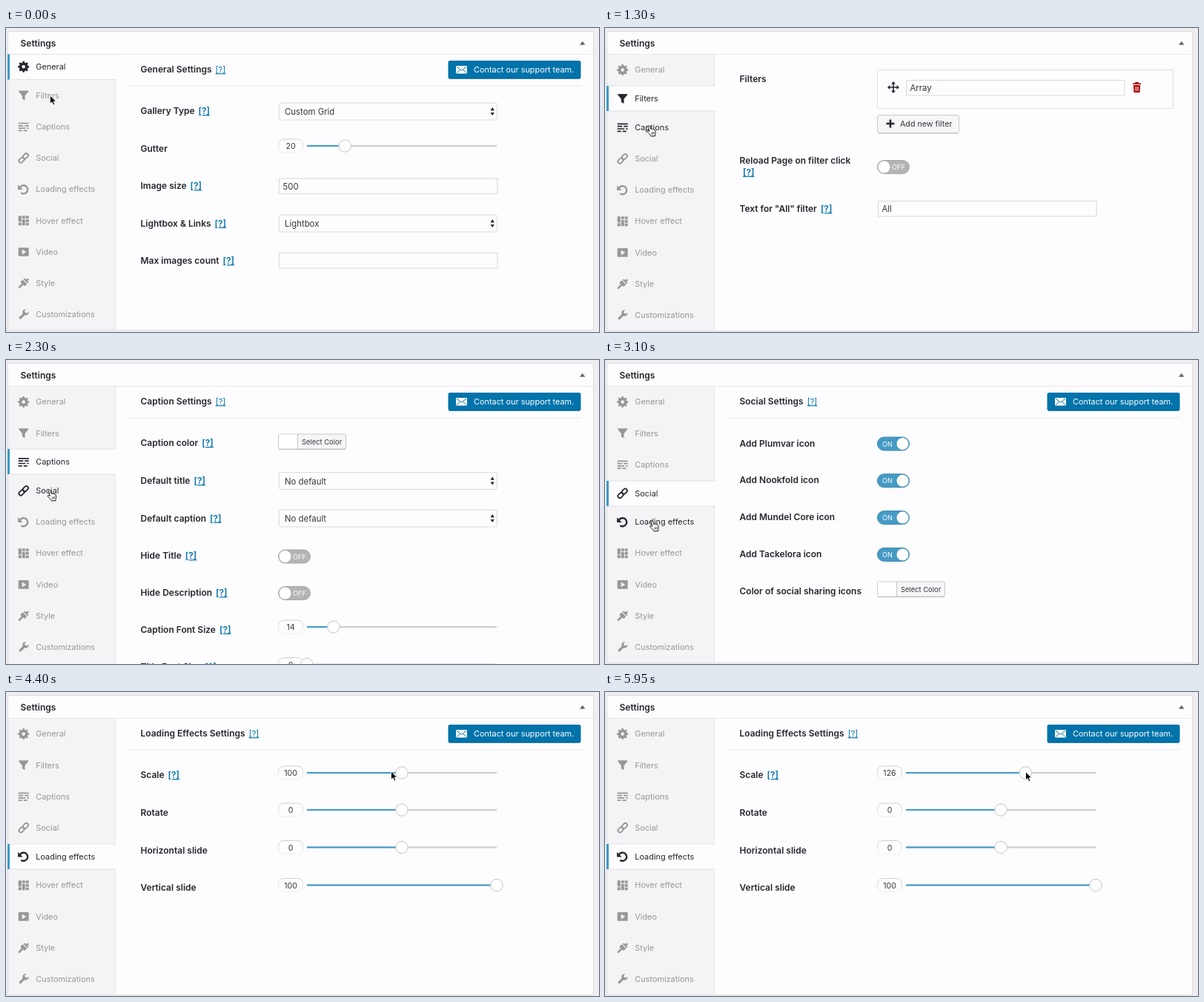
Recreate the animation shown at these times as an HTML page. Size 800x410 px, loop 6 s.

```html
<!DOCTYPE html>
<html lang="en">
<head>
<meta charset="utf-8">
<title>Settings panel</title>
<style>
  html, body { margin: 0; width: 100%; height: 100%; overflow: hidden; background: #eeedef; }
  svg { display: block; width: 800px; height: 410px; font-family: Inter, "Open Sans", sans-serif; }
  text { fill: #32373c; white-space: pre; }
  .b { font-size: 12px; font-weight: 600; fill: #23282d; }
  .f { font-size: 11.4px; }
  .q { fill: #0073aa; text-decoration: underline; }
  .n { font-size: 11px; font-weight: 400; }
  .side { font-size: 10.9px; fill: inherit; }
  .box { fill: #fefdfe; stroke: #d9d8da; }
</style>
</head>
<body>
<svg id="stage" viewBox="0 0 800 410"></svg>
<script>
const LOOP = 6000, STEP = 50;
const BLUE = '#3a9bc9', DARK = '#23282d', GREY = '#979698';
const TRACK = 406, SPAN = 256;
const stage = document.getElementById('stage');
const $ = id => document.getElementById(id);

const text = (x, y, s, cls = 'f', extra = '') =>
  `<text x="${x}" y="${y + 4.2}" class="${cls}" ${extra}>${s}</text>`;
const rect = (x, y, w, h, r = 0, attrs = 'class="box"') =>
  `<rect x="${x}" y="${y}" width="${w}" height="${h}" rx="${r}" ${attrs}/>`;
const path = (d, attrs = '') => `<path d="${d}" ${attrs}/>`;

const label = (y, s, help = true) =>
  text(181.5, y, s + (help ? '<tspan dx="5" class="q">[?]</tspan>' : ''), 'b');

const input = (y, s = '', x = 368.5) =>
  rect(x, y - 10, 294.5, 20.5) + text(x + 5, y + .5, s);

const select = (y, s) =>
  rect(368.5, y - 11.5, 294, 23, 2.5) + text(376, y + .3, s) +
  path(`M653.5 ${y - 1.2}l2.7-4.2 2.7 4.2zm0 2.6l2.7 4.2 2.7-4.2z`, `fill="${DARK}"`);

const knobX = part => TRACK + SPAN * part;

const slider = (y, value, part, id = '') => {
  const x = knobX(part);
  const name = s => id ? `id="${id + s}"` : '';
  return rect(367.5, y - 9, 33, 18, 7, 'fill="#fefdfe" stroke="url(#fade)"') +
    text(384, y + .2, value, '', `${name('Val')} font-size="10.6" text-anchor="middle"`) +
    path(`M${TRACK} ${y}H${TRACK + SPAN}`, 'stroke="#cbcacc" stroke-width="2"') +
    `<line x1="${TRACK}" x2="${x}" y1="${y}" y2="${y}" stroke="${BLUE}" stroke-width="2" ${name('Bar')}/>` +
    `<circle cx="${x}" cy="${y}" r="8.2" fill="#fff" stroke="#c5c4c6" ${name('Knob')}/>`;
};

const toggle = (y, on) =>
  rect(367.5, y - 9, 43, 18, 9, on
    ? 'fill="#459ac4" stroke="#3c88ae"' : 'fill="#b4b3b5" stroke="#a6a5a7"') +
  text(on ? 374 : 387, y - .6, on ? 'ON' : 'OFF', '', 'font-size="9.2" style="fill:#fff"') +
  `<circle cx="${on ? 401.5 : 376.5}" cy="${y}" r="8" fill="#fff"/>`;

const colorPick = y =>
  rect(367.5, y - 10, 91, 20, 2, 'fill="#f6f5f7" stroke="#c9c8ca"') +
  rect(368, y - 9.5, 25.5, 19, 1.5, 'fill="#fff"') +
  path(`M393.5 ${y - 10}v20`, 'stroke="#c9c8ca"') +
  path(`M368 ${y + 10.5}H458`, 'stroke="#bdbcbe"') +
  text(399, y - .5, 'Select Color', '', 'font-size="9.4"');

const heading = s =>
  text(181.5, 56, `${s}<tspan dx="5" class="q n">[?]</tspan>`, 'b') +
  path('M164 78H776', 'stroke="#eae9eb"') +
  rect(596.5, 44, 179, 24.5, 2.5, 'fill="#0073aa"') +
  path('M598 68H774', 'stroke="#005f8d"') +
  rect(607, 51, 15, 10.5, 1, 'fill="#fff"') +
  path('M608 52.3l6.5 5 6.5-5M608 60.5l4.3-4M621 60.5l-4.3-4', 'fill="none" stroke="#0073aa"') +
  text(631, 56, 'Contact our support team.', '', 'font-size="10.9" style="fill:#fff"');

const general = heading('General Settings') +
  label(112, 'Gallery Type') + select(112.5, 'Custom Grid') +
  label(163, 'Gutter', false) + slider(159, 20, .2) +
  label(213, 'Image size') + input(213, '500') +
  label(263.5, 'Lightbox &amp; Links') + select(263.5, 'Lightbox') +
  label(314, 'Max images count') + input(313.5);

const trash =
  path('M712 76h11v-1.5h-3.2V73h-4.6v1.5H712zM712.8 77h9.4l-.7 10h-8z', 'fill="#a00"') +
  path('M715.6 79v6M717.5 79v6M719.4 79v6', 'stroke="#fff" stroke-width=".8"');
const arrows =
  path('M382 80h14M389 73v14', `stroke="${DARK}" stroke-width="1.6"`) +
  path('M389 72l3 3.4h-6zM389 88l3-3.4h-6zM381 80l3.4-3v6zM397 80l-3.4-3v6z', `fill="${DARK}"`);

const filters = label(69, 'Filters', false) +
  rect(367.5, 56.5, 399, 52, 0, 'fill="none" stroke="#e0dfe1"') +
  arrows + input(80.5, 'Array', 406.5) + trash +
  rect(367.5, 117.5, 110, 24, 2.5, 'fill="#f6f5f7" stroke="#c9c8ca"') +
  path('M369 142H476', 'stroke="#bdbcbe"') +
  path('M379.5 129h11M385 123.5v11', `stroke="${DARK}" stroke-width="2.6"`) +
  text(398, 129.2, 'Add new filter', '', 'font-size="10.7"') +
  label(179, 'Reload Page on filter click', false) +
  text(186, 194.5, '[?]', 'b q', 'style="fill:#0073aa"') + toggle(187.5, false) +
  label(244, 'Text for "All" filter') + input(243.5, 'All');

const captions = heading('Caption Settings') +
  label(112, 'Caption color') + colorPick(110) +
  label(163, 'Default title') + select(163, 'No default') +
  label(213.5, 'Default caption') + select(213.5, 'No default') +
  label(264, 'Hide Title') + toggle(265, false) +
  label(314, 'Hide Description') + toggle(314.5, false) +
  label(363.5, 'Caption Font Size') + slider(360, 14, .14) +
  label(414, 'Title Font Size') + slider(410.5, 0, 0);

const networks = ['Plumvar', 'Nookfold', 'Mundel Core', 'Tackelora'];
const social = heading('Social Settings') +
  networks.map((s, i) => label(112.3 + 49.8 * i, `Add ${s} icon`, false) +
    toggle(113 + 49.8 * i, true)).join('') +
  label(311.5, 'Color of social sharing icons', false) + colorPick(309);

const loading = heading('Loading Effects Settings') +
  label(112, 'Scale') + slider(109, 100, .5, 'scale') +
  label(163, 'Rotate', false) + slider(159, 0, .5) +
  label(213.5, 'Horizontal slide', false) + slider(209.5, 0, .5) +
  label(264, 'Vertical slide', false) + slider(260.5, 100, 1);

const panels = [general, filters, captions, social, loading];

// Icons are drawn around (0,0) in the current fill colour
const line = (d, w = 1.7) => path(d, `fill="none" stroke="currentColor" stroke-width="${w}"`);
const gear = '<circle r="4.1" fill="none" stroke="currentColor" stroke-width="3.6"/>' +
  [0, 45, 90, 135].map(a => `<g transform="rotate(${a})">` +
    path('M-1.6-5l.5-2.5h2.2l.5 2.5zM-1.6 5l.5 2.5h2.2l.5-2.5z') + '</g>').join('');
const link = '<g transform="rotate(-45)">' +
  [-7.8, -.4].map(x => rect(x, -2.6, 8.2, 5.2, 2.6,
    'fill="none" stroke="currentColor" stroke-width="1.8"')).join('') + '</g>';

const items = [
  ['General', gear],
  ['Filters', path('M-6.5-6.5h13v1.2L1.8.4V6.5L-1.8 4.5V.4L-6.5-5.3z')],
  ['Captions', line('M-7-4.7H7M-7-1.4H-.5M1.5-1.4H7M-7 1.9H2.5M4.5 1.9H7M-7 5.2H-2M0 5.2H5')],
  ['Social', link],
  ['Loading effects', line('M-4.8-2.8A5.6 5.6 0 1 1-3.4 4.7', 2.4) + path('M-7.6-6.2V.4H-1z')],
  ['Hover effect', path('M-7-6.5h4.2v8H-7zM-7 2.6h4.2v3.9H-7zM-1.8-6.5h3.8v3.6h-3.8zM3-6.5h4v3.6H3z' +
    'M-1.8-1.9h3.8v8.4h-3.8zM3-1.9h4v4H3zM3 3.1h4v3.4H3z')],
  ['Video', path('M-6-5.8H6Q7-5.8 7-4.8V4.8Q7 5.8 6 5.8H-6Q-7 5.8-7 4.8V-4.8Q-7-5.8-6-5.8z') +
    path('M-2-3.4L3.6 0-2 3.4z', 'fill="#f4f3f5"')],
  ['Style', path('M-7 5.2L-2.6.4-4.4-1.6-1.2-4.8 4.6 1 1.4 4 -.6 2.2-5.2 6.8Q-7.4 7-7 5.2z') +
    path('M-.3-5.6L2.2-6.4 3.4-5 6.6-6.6 7.2-5 5.4-2.8 6.8-1.6 5.4.2z')],
  ['Customizations', line('M-5.4 5.4L2.6-2.6', 3.2) +
    path('M6.6-3.8L4.4-1.6 1.6-2.2 1.2-4.6 3.6-6.8Q-.2-7.6-1.4-4.2-1.8-1.4.2.6 3.2 2 5.6.2 7.2-1.6 6.6-3.8z')]
];

stage.innerHTML = `
  <defs><linearGradient id="fade" x1="0" y1="0" x2="0" y2="1">
    <stop offset="0" stop-color="#cfced0"/><stop offset="1" stop-color="#f0eff1"/>
  </linearGradient></defs>
  <rect width="800" height="410" fill="#eeedef"/>
  <rect id="frame" x="2.5" y="4.5" width="790" fill="#fdfcfe" stroke="#dfdee0"/>
  <rect id="bar" x="3" y="36" width="144.5" fill="#f4f3f5"/>
  <path id="edge" stroke="#e6e5e7"/>
  <path d="M3 35.5H792" stroke="#e8e7e9"/>
  ${text(19.5, 20.3, 'Settings', 'b')}
  <path d="M774 22.8l3.7-5 3.7 5z" fill="#666a6e"/>
  <g id="active">
    ${rect(3, -17, 145.5, 34, 0, 'fill="#fdfcfe"')}
    <path d="M3-17H148M3 17H148" stroke="#e3e2e4"/>
    ${rect(2, -17, 3, 34, 0, `fill="${BLUE}"`)}
  </g>
  ${items.map(([s, icon], i) => `<g id="item${i}">
    <g transform="translate(23.7 .3)">${icon}</g>${text(40.3, -.2, s, 'side')}</g>`).join('')}
  ${panels.map((p, i) => `<g id="panel${i}">${p}</g>`).join('')}
  <path id="arrow" d="M0 0V11.2L2.6 8.8 4.5 13 6.4 12.1 4.6 8.1H8.1Z" fill="#000" stroke="#fff" stroke-width=".9"/>
  <g id="hand" stroke="#111" stroke-width="1" stroke-linejoin="round">
    <path fill="#fff" d="M-1.2.6C-.8-.8 1-.6 1.4.6L2.8 4.4C3.6 3.7 4.5 4 4.9 4.7 5.7 4.1 6.6 4.5 6.9 5.2 7.8 4.8 8.5 5.4 8.7 6.2L9.1 8.2C9.4 9.8 8.8 11 8.5 12L8.4 13.8H2.8L2.2 12.3C1 11-.8 9.6-2 8.2-2.8 7 -1.6 6 -.4 6.7L.9 7.5Z"/>
    <path d="M3.7 8.6l.4 3M5.4 8.4l.3 3M7 8.2l.2 3" stroke-width=".7"/>
  </g>`;

const clicks = [1000, 1750, 2450, 3250];
const HOVER_AT = 200;
const moves = [
  [0, 59.5, 91], [150, 59.5, 91], [250, 58.5, 88], [1050, 58.5, 88],
  [1300, 59, 132], [1850, 59, 132], [2150, 58.5, 176], [2550, 58.5, 176],
  [2850, 63, 217], [3500, 63, 217], [4050, 481, 111], [4400, 519.5, 107],
  [4700, 533.5, 107], [4800, 533.5, 107], [5300, 567.5, 107.7], [LOOP, 567.5, 107.7]
];
const DRAG_AT = 4750;

function cursorAt(t) {
  const i = moves.findIndex(m => m[0] > t);
  const [t0, x0, y0] = moves[i - 1], [t1, x1, y1] = moves[i];
  const p = (t - t0) / (t1 - t0), e = p * p * (3 - 2 * p);
  return [x0 + (x1 - x0) * e, y0 + (y1 - y0) * e];
}

function itemY(i, tab) {
  const shift = i < tab ? 0 : i === tab ? -3.4 : -6.9;
  return 56.3 + 42.2 * i + shift - (tab === 0 ? .9 : 0);
}

const move = (el, x, y) => el.setAttribute('transform', `translate(${x} ${y})`);
const show = (el, on) => el.setAttribute('visibility', on ? 'visible' : 'hidden');

function render(t) {
  const tab = clicks.filter(c => t >= c).length;
  const [x, y] = cursorAt(t);
  const hand = t >= HOVER_AT && x < 148;

  const bottom = tab === 0 ? 407.5 : tab === 2 ? 415 : 408.5;
  $('frame').setAttribute('height', bottom - 4.5);
  $('bar').setAttribute('height', bottom - 36.5);
  $('edge').setAttribute('d', `M147.5 36V${bottom}`);

  move($('active'), 0, Math.round(itemY(tab, tab)) + (tab ? 0 : .5));
  items.forEach((_, i) => {
    const el = $('item' + i), cy = itemY(i, tab);
    const dark = i === tab || (hand && Math.abs(y + 2 - cy) < 19);
    move(el, 0, cy);
    el.setAttribute('fill', dark ? DARK : GREY);
    el.setAttribute('color', dark ? DARK : GREY);
  });
  panels.forEach((_, i) => show($('panel' + i), i === tab));

  const value = t < DRAG_AT ? 100 : Math.max(100, Math.round((x - TRACK) / SPAN * 200));
  const kx = knobX(value / 200);
  $('scaleVal').textContent = value;
  $('scaleBar').setAttribute('x2', kx);
  $('scaleKnob').setAttribute('cx', kx);

  show($('hand'), hand);
  show($('arrow'), !hand);
  move($(hand ? 'hand' : 'arrow'), x, y);
}

function tick(now) {
  const t = now % LOOP;
  render(t - t % STEP);
  requestAnimationFrame(tick);
}
render(0);
requestAnimationFrame(tick);
</script>
</body>
</html>
```
